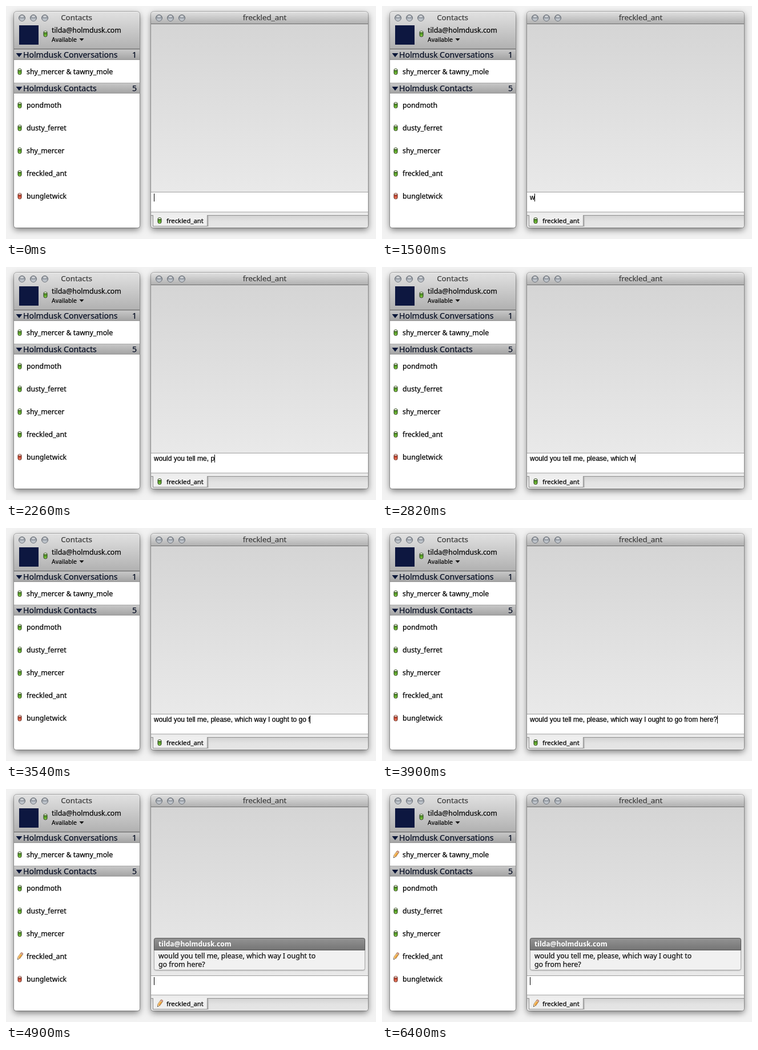
An HTML page with a canvas that plays this animation: 648 px wide and 410 px high, repeating every 8 s.

```html
<!DOCTYPE html>
<html lang="en">
<head>
<meta charset="utf-8">
<title>Chat</title>
<style>
html, body { margin: 0; width: 100%; height: 100%; overflow: hidden; background: #f2f2f2; }
canvas { display: block; }
</style>
</head>
<body>
<canvas id="stage" width="648" height="410"></canvas>
<script>
const ctx = document.getElementById('stage').getContext('2d');
const UI = '"Noto Sans", "Open Sans", sans-serif';
const INPUT = '"Liberation Sans", Arial, sans-serif';

const LOOP = 8000;
const TYPE_START = 1500, TYPE_STEP = 40;
const SENT = 4400, FRIEND_TYPING = 4900, GROUP_TYPING = 6400;

const ME = 'tilda@holmdusk.com';
const FRIEND = 'freckled_ant';
const MESSAGE = 'would you tell me, please, which way I ought to go from here?';
const CONTACTS = ['pondmoth', 'dusty_ferret', 'shy_mercer', FRIEND, 'bungletwick'];

function vertical(y0, y1, ...colors) {
  const g = ctx.createLinearGradient(0, y0, 0, y1);
  colors.forEach((c, i) => g.addColorStop(i / (colors.length - 1), c));
  return g;
}

function rect(x, y, w, h, fill) {
  ctx.fillStyle = fill;
  ctx.fillRect(x, y, w, h);
}

function roundRect(x, y, w, h, r, fill, stroke) {
  ctx.beginPath();
  ctx.roundRect(x, y, w, h, r);
  if (fill) { ctx.fillStyle = fill; ctx.fill(); }
  if (stroke) { ctx.strokeStyle = stroke; ctx.lineWidth = 1; ctx.stroke(); }
}

function poly(points, fill) {
  ctx.beginPath();
  points.forEach(([x, y]) => ctx.lineTo(x, y));
  ctx.closePath();
  ctx.fillStyle = fill;
  ctx.fill();
}

// A hairline stroke gives the text its slightly heavy desktop rendering.
function text(str, x, y, size, color = '#000', { align = 'left', weight = 400, family = UI, heavy = .25 } = {}) {
  ctx.font = `${weight} ${size}px ${family}`;
  ctx.textAlign = align;
  ctx.fillStyle = ctx.strokeStyle = color;
  ctx.lineWidth = heavy;
  ctx.lineJoin = 'round';
  ctx.fillText(str, x, y);
  if (heavy) ctx.strokeText(str, x, y);
}

function embossed(str, x, y, size, color, opts) {
  text(str, x, y + 1, size, 'rgba(255,255,255,.4)', { ...opts, heavy: 0 });
  text(str, x, y, size, color, opts);
}

function trafficLight(x, y) {
  ctx.beginPath();
  ctx.arc(x, y, 5.5, 0, Math.PI * 2);
  ctx.fillStyle = vertical(y - 6, y + 6, '#777d85', '#9da3ab', '#e4e9ef');
  ctx.fill();
  ctx.strokeStyle = '#656a72';
  ctx.lineWidth = 1;
  ctx.stroke();
  ctx.beginPath();
  ctx.ellipse(x, y - 3, 3, 1.6, 0, 0, Math.PI * 2);
  ctx.fillStyle = 'rgba(255,255,255,.65)';
  ctx.fill();
}

function windowFrame(x, w, title, titleX, barEnd, drawBody) {
  ctx.save();
  ctx.shadowColor = 'rgba(0,0,0,.5)';
  ctx.shadowBlur = 12;
  ctx.shadowOffsetY = 4;
  roundRect(x, 10, w, 380, [5, 5, 4, 4], '#fff');
  ctx.restore();

  ctx.save();
  ctx.beginPath();
  ctx.roundRect(x, 10, w, 380, [5, 5, 4, 4]);
  ctx.clip();
  rect(x, 10, w, barEnd - 10, vertical(10, barEnd, '#e1e1e1', '#b1b1b1'));
  rect(x, 10, w, 1, '#f1f1f1');
  rect(x, barEnd, w, 1, '#6e6e6e');
  for (let i = 0; i < 3; i++) trafficLight(x + 14 + i * 20, 21);
  embossed(title, titleX, 25, 13.35, '#3a3a3a', { align: 'center' });
  drawBody();
  ctx.restore();
  roundRect(x - .5, 9.5, w + 1, 381, [5, 5, 4, 4], null, 'rgba(0,0,0,.25)');
}

// Status light, a small capped cylinder; (x, y) is its centre.
function pill(x, y, online) {
  const [cap, light, dark, edge] = online
    ? ['#e6f3d8', '#8fd24e', '#4f9a1f', '#26381c']
    : ['#f8dcd2', '#f08a6c', '#c9452f', '#5e251d'];
  roundRect(x - 3, y - 4.5, 6, 10, 2.5, vertical(y - 4, y + 5, light, dark, light), edge);
  rect(x - 2, y - 4, 4, 2, cap);
  rect(x - 2.5, y - 2, 5, 1, edge);
}

function pencil(x, y) {
  ctx.save();
  ctx.translate(x, y);
  ctx.rotate(Math.atan2(-12, 8.5));
  poly([[-7.8, 0], [-3.8, -2.5], [5, -2.5], [7, -1.8], [7, 1.8], [5, 2.5], [-3.8, 2.5]], '#8b653c');
  poly([[-7, 0], [-3.6, -1.7], [-3.6, 1.7]], '#f0d5a8');
  rect(-3.7, -1.8, 7.5, 3.6, '#eda33e');
  rect(-3.7, -1.8, 7.5, 1.2, '#ffd083');
  rect(3.6, -1.8, 1.2, 3.6, '#c4c4c4');
  rect(4.8, -1.6, 1.8, 3.2, '#e99a8d');
  poly([[-8, 0], [-6, -1], [-6, 1]], '#333');
  ctx.restore();
}

function status(x, y, typing, online = true) {
  if (typing) pencil(x + .7, y);
  else pill(x, y, online);
}

function groupHeader(y, label, count) {
  rect(14, y, 220, 19, vertical(y, y + 19, '#c9c9c9', '#a2a2a2'));
  rect(14, y, 220, 1, '#a8a8a8');
  rect(14, y + 18, 220, 1, '#969696');
  poly([[17.5, y + 7], [28.5, y + 7], [23, y + 14]], '#0a1638');
  embossed(label, 30, y + 15, 14.1, '#050d22');
  embossed(count, 229, y + 15, 14.1, '#050d22', { align: 'right' });
}

function contactList(t) {
  rect(23, 34, 34, 34, '#0d1740');
  pill(69, 48.5, true);
  embossed(ME, 80, 47, 12.3, '#000');
  embossed('Available', 80, 63, 10.4, '#000');
  poly([[128.5, 57], [136.5, 57], [132.5, 61.5]], '#111');

  groupHeader(76, 'Holmdusk Conversations', '1');
  status(24, 115, t >= GROUP_TYPING);
  text('shy_mercer & tawny_mole', 36, 120, 12.3);

  groupHeader(135, 'Holmdusk Contacts', '5');
  CONTACTS.forEach((name, i) => {
    const y = 174 + i * 40;
    status(24, y, name === FRIEND && t >= FRIEND_TYPING, i < 4);
    text(name, 36, y + 5, 12.3);
  });
}

function bubble() {
  ctx.save();
  ctx.shadowColor = 'rgba(0,0,0,.3)';
  ctx.shadowBlur = 2;
  ctx.shadowOffsetY = 1;
  roundRect(259.5, 262.5, 369, 56, 3, '#f1f1f1');
  ctx.restore();
  roundRect(259.5, 262.5, 369, 56, 3, null, '#aaa');
  roundRect(259.5, 262.5, 369, 21, [3, 3, 0, 0], vertical(262, 284, '#949494', '#747474'), '#565656');
  text(ME, 267, 277, 12.1, '#fff', { weight: 700, heavy: 0 });
  text('would you tell me, please, which way I ought to', 267, 298, 12.4, '#111');
  text('go from here?', 267, 313, 12.4, '#111');
}

function inputBox(t, sent) {
  const top = sent ? 328 : 327;
  rect(254, top, 380, 1, '#a0a0a0');
  rect(254, top + 1, 380, 362 - top, '#fff');
  rect(254, 362, 380, 1, '#a6a6a6');

  const count = sent || t < TYPE_START ? 0 : Math.floor((t - TYPE_START) / TYPE_STEP) + 1;
  const typed = MESSAGE.slice(0, count);
  text(typed, 259, top + 14, 12, '#000', { family: INPUT });
  const caret = 259 + Math.floor(ctx.measureText(typed).width);
  rect(caret, top + 3, 1, 14, '#000');
}

function tabBar(typing) {
  rect(254, 363, 380, 27, '#ebebeb');
  rect(254, 368, 380, 22, vertical(368, 390, '#d2d2d2', '#e3e3e3', '#e6e6e6'));
  rect(254, 368, 380, 1, '#8d8d8d');
  rect(353, 369, 2, 19, '#bcbcbc');
  rect(257, 367, 96, 21, '#efefef');
  rect(257, 368, 1, 20, '#8d8d8d');
  rect(352, 368, 1, 20, '#8d8d8d');
  rect(257, 387, 96, 1, '#8d8d8d');
  status(269, 377, typing);
  text(FRIEND, 281, 382, 11.3);
}

function chat(t) {
  const sent = t >= SENT;
  rect(254, 32, 380, 296, vertical(32, 328, '#d5d5d5', '#e9e9e9'));
  if (sent) bubble();
  inputBox(t, sent);
  tabBar(t >= FRIEND_TYPING);
}

function draw(t) {
  rect(0, 0, 648, 410, '#f2f2f2');
  windowFrame(14, 220, 'Contacts', 123.5, 75, () => contactList(t));
  windowFrame(254, 380, FRIEND, 453, 31, () => chat(t));
}

let start;
function tick(now) {
  start ??= now;
  draw((now - start) % LOOP);
  requestAnimationFrame(tick);
}
draw(0);
requestAnimationFrame(tick);
</script>
</body>
</html>
```
